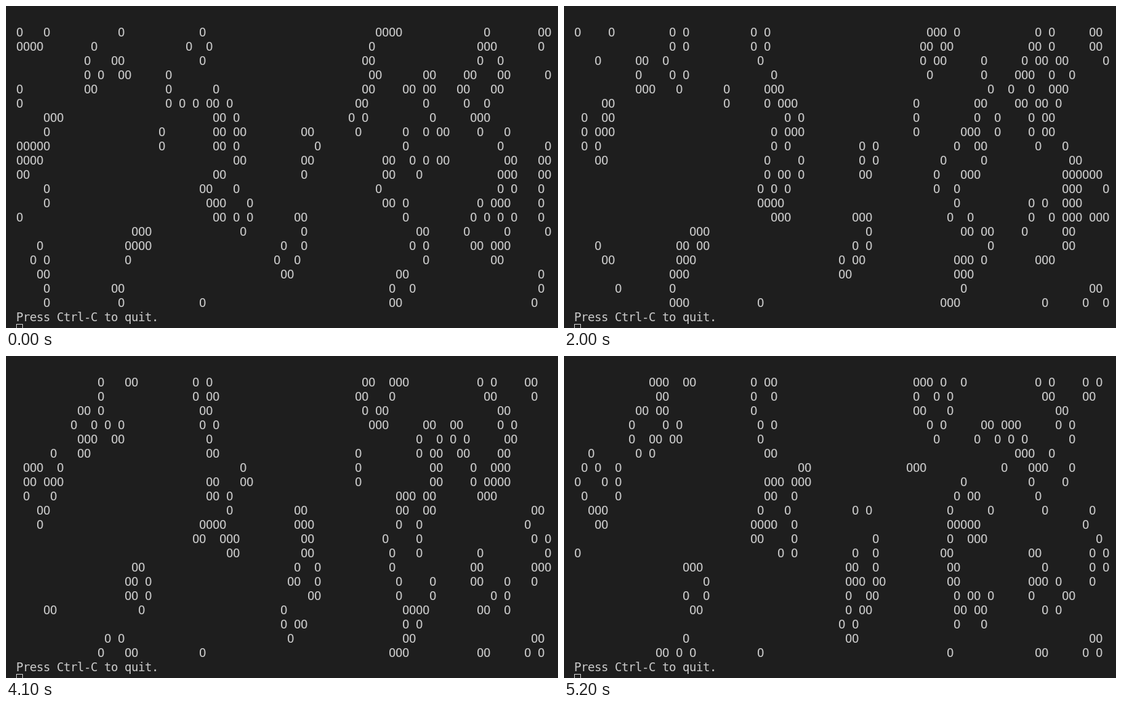
An HTML page that plays this animation: 815 by 475 pixels, repeating every 5.6 s.

```html
<!DOCTYPE html>
<html lang="en">
<head>
<meta charset="utf-8">
<title>Game of Life</title>
<style>
  html, body { margin: 0; width: 100%; height: 100%; overflow: hidden; background: #1e1e1e; }
  svg { display: block; }
  text { font: 17.5px "DejaVu Sans Mono", monospace; fill: #ccc; }
  rect { fill: none; stroke: #ccc; }
</style>
</head>
<body>
<svg width="815" height="475" viewBox="0 0 815 475">
  <g id="screen"></g>
  <rect x="15.5" y="469.5" width="9" height="20"/>
</svg>
<script>
const COLS = 79, ROWS = 20;
const CELL_W = 10, CELL_H = 21, LEFT = 15, BASELINE = 45;
const LOOP = 5600;

// Start time of each screen and the generation it shows; null is a cleared screen.
const schedule = [
  [0, 0], [1000, 1], [2000, 2], [3100, 3], [4100, 4], [5100, null], [5200, 5]
];

// Starting colonies: column, row, rows of cells.
const colonies = [
  [0, 0, "O...O/OOOO"],
  [0, 4, "O/O/....OOO/....O/OOOOO/OOOO/OO/....O/....O/O"],
  [2, 15, ".O/O.O/.OO/..O/..O"],
  [10, 0, ".....O/.O/O...OO/O.O..OO/OO"],
  [16, 14, ".OOO/OOOO/O"],
  [14, 18, "OO/.O"],
  [25, 0, "..O/O..O/..O"],
  [21, 3, ".O/.O......O/.O.O.O.OO.O/........OO.O/O.......OO.OO/O.......OO.O"],
  [27, 9, ".....OO/..OO/OO...O/.OOO...O/..OO.O.O/......O"],
  [27, 19, "O"],
  [42, 7, "OO/..O/OO/O"],
  [38, 13, "...OO/....O/.O..O/O..O/.OO"],
  [49, 0, "....OOOO/...O/..OO/...OO......OO/..OO....OO.OO/.OO........O/O.O.........O/.O......O..O.OO"],
  [53, 8, "....O/.OO..O.O.OO/.OO...O/O/.OO.O/....O"],
  [58, 14, ".OO/O.O/..O"],
  [55, 17, ".OO/O..O/OO"],
  [65, 0, "....O.......OO/...OOO......O/...O..O/.OO...OO.....O/OO...OO/.O..O/..OOO/...O...O"],
  [71, 8, "O......O/.OO...OO/OOO...OO/O.O...O"],
  [65, 12, "...O.OOO....O/..O.O.O.O...O/.O.....O.....O/..OO.OOO/.....OO"],
  [76, 17, ".O/.O/O"]
];

const makeGrid = alive =>
  Array.from({ length: ROWS }, (_, y) => Array.from({ length: COLS }, (_, x) => alive(x, y)));

function seedGrid() {
  const grid = makeGrid(() => false);
  for (const [col, row, shape] of colonies)
    shape.split("/").forEach((line, y) =>
      [...line].forEach((cell, x) => { if (cell === "O") grid[row + y][col + x] = true; }));
  return grid;
}

// One step of Conway's rules on a grid that wraps at the edges.
function nextGeneration(grid) {
  return makeGrid((x, y) => {
    let count = 0;
    for (let dy = -1; dy <= 1; dy++)
      for (let dx = -1; dx <= 1; dx++)
        if ((dx || dy) && grid[(y + dy + ROWS) % ROWS][(x + dx + COLS) % COLS]) count++;
    return count === 3 || (count === 2 && grid[y][x]);
  });
}

const generations = [seedGrid()];
while (generations.length < 6) generations.push(nextGeneration(generations.at(-1)));

// Each character sits in its own terminal cell.
function textLine(row, columns, content) {
  const xs = columns.map(col => LEFT + col * CELL_W).join(" ");
  return `<text x="${xs}" y="${BASELINE + row * CELL_H}">${content}</text>`;
}

const prompt = "Press Ctrl-C to quit.";
const promptLine = textLine(ROWS, [...prompt].map((_, i) => i), prompt);

function renderGrid(grid) {
  const lines = grid.map((cells, row) => {
    const columns = cells.flatMap((alive, col) => alive ? [col] : []);
    return columns.length ? textLine(row, columns, "O".repeat(columns.length)) : "";
  });
  return lines.join("") + promptLine;
}

const screen = document.getElementById("screen");
let shown;

function update(time) {
  const t = time % LOOP;
  const generation = schedule.findLast(([start]) => t >= start)[1];
  if (generation === shown) return;
  shown = generation;
  screen.innerHTML = generation === null ? "" : renderGrid(generations[generation]);
}

function tick() {
  update(performance.now());
  requestAnimationFrame(tick);
}
tick();
</script>
</body>
</html>
```
